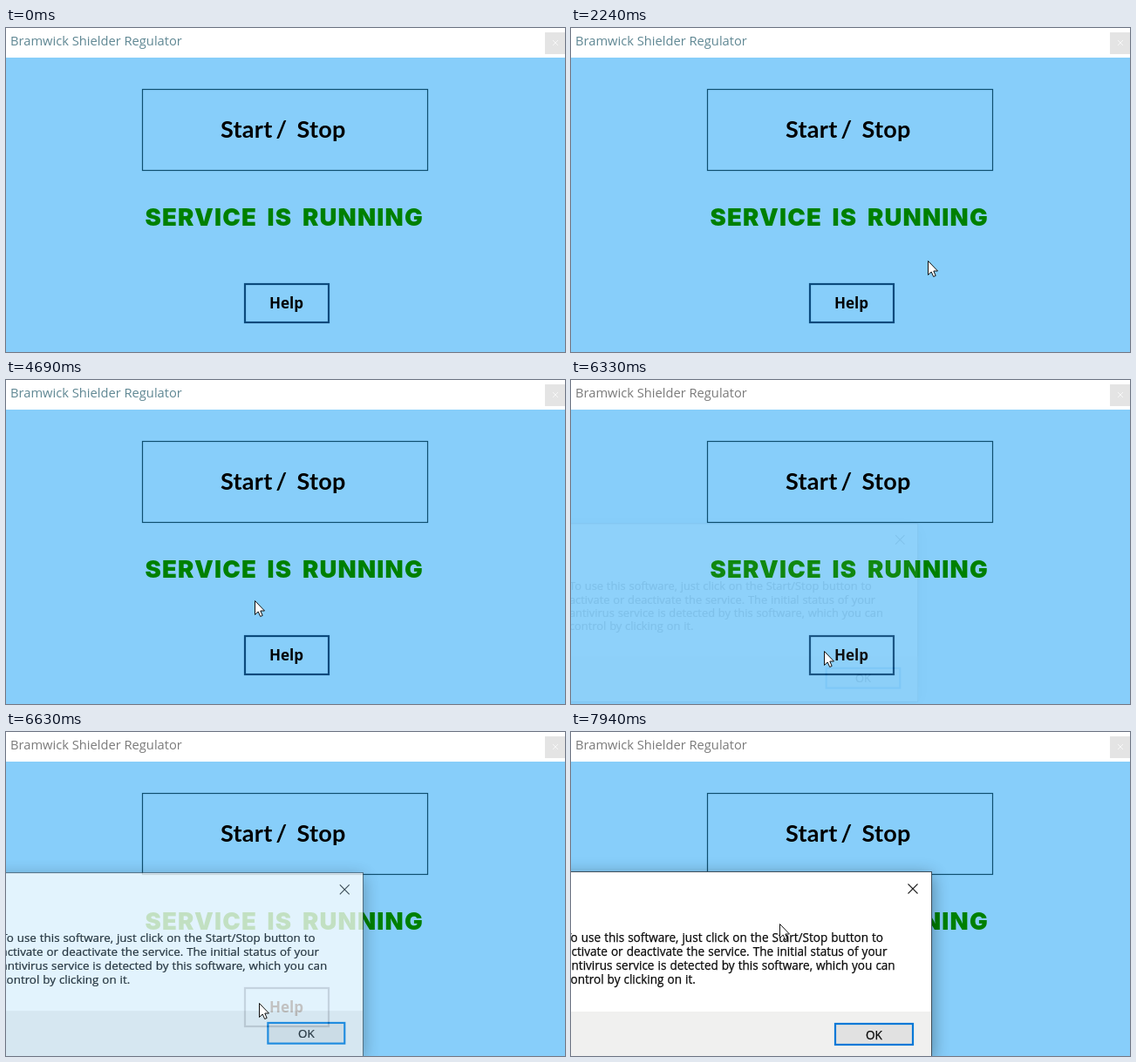
These frames come from a looping animation (641 by 372 pixels, 8000 ms). An HTML page:

```html
<!DOCTYPE html>
<html lang="en">
<head>
<meta charset="utf-8">
<title>Service controller</title>
<style>
  html, body { margin: 0; width: 100%; height: 100%; overflow: hidden; background: #87cefa; }
  svg { display: block; width: 100%; height: 100%; }
  text { font-family: "Open Sans", "Noto Sans", sans-serif; white-space: pre; }
  .caption { font-size: 14.7px; }
  .action { font: 700 27px Lato, sans-serif; letter-spacing: .3px; }
  .status { font: 900 27.5px Inter, sans-serif; letter-spacing: 1.2px; fill: #008000; }
  .help { font-size: 17px; font-weight: 700; }
  .message { font-size: 13.55px; word-spacing: .5px; fill: #0a0a0a; stroke: #0a0a0a; stroke-width: .25px; }
</style>
</head>
<body>
<svg viewBox="0 0 641 372">
  <defs>
    <filter id="blur" x="-20%" y="-20%" width="140%" height="140%">
      <feGaussianBlur stdDeviation="10"/>
    </filter>
  </defs>

  <rect width="641" height="372" fill="#87cefa"/>
  <rect width="641" height="34" fill="#fff"/>
  <text id="caption" class="caption" x="5" y="20">Bramwick Shielder Regulator</text>
  <rect x="618" y="5" width="23" height="25" fill="#e4e4e4"/>
  <path d="M627 14l6 6m0-6l-6 6" stroke="#f6f6f6"/>

  <rect x="156.5" y="70.5" width="327" height="93" fill="none" stroke="#0f4f70" stroke-width="1.2"/>
  <text class="action" x="246" y="126">Start</text>
  <text class="action" x="309.5" y="126">/</text>
  <text class="action" x="333.5" y="126">Stop</text>

  <text class="status" x="159.5" y="227">SERVICE</text>
  <text class="status" x="299.5" y="227">IS</text>
  <text class="status" x="340" y="227">RUNNING</text>

  <rect x="274" y="294" width="96" height="44" fill="none" stroke="#0b4a7c" stroke-width="2.2"/>
  <text class="help" x="321.5" y="322" text-anchor="middle">Help</text>

  <g id="dialog">
    <rect x="-220" y="165" width="634" height="212" fill="#000" opacity=".4" filter="url(#blur)"/>
    <rect x="-220" y="160" width="634" height="216" fill="#3f505c"/>
    <rect x="-219" y="161" width="632" height="214" fill="#fff"/>
    <rect x="-219" y="321" width="632" height="54" fill="#f0f0ef"/>
    <path d="M386.500 174.500l11 11m0-11l-11 11" stroke="#222" stroke-width="1.1"/>
    <g id="message"></g>
    <rect x="303" y="335" width="89" height="24" fill="#e1e1e1" stroke="#0078d7" stroke-width="2.2"/>
    <text class="message" x="347.5" y="352.5" text-anchor="middle">OK</text>
  </g>

  <path id="cursor" d="M.5 .5V16.500L4.200 13L6.700 18.500L9.200 17.400L6.800 12H11.500Z"
        fill="#fff" stroke="#111" stroke-linejoin="round"/>
</svg>

<script>
  const LOOP = 8000;
  const el = id => document.getElementById(id);
  const caption = el('caption'), dialog = el('dialog'), cursor = el('cursor');

  const lines = [
    'To use this software, just click on the Start/Stop button to',
    'activate or deactivate the service. The initial status of your',
    'antivirus service is detected by this software, which you can',
    'control by clicking on it.'
  ];
  el('message').innerHTML = lines.map((line, i) =>
    `<text class="message" x="-7" y="${241 + 16 * i}">${line}</text>`).join('');

  // Pointer path: time, x, y
  const path = [
    [120, 556, 367], [920, 491, 319], [1740, 439, 281], [2480, 395, 260],
    [2560, 395, 260], [3300, 348, 229], [3380, 348, 229], [3700, 328, 227],
    [4130, 304, 233], [4210, 304, 233], [4690, 285, 253], [5030, 281, 273],
    [5750, 290, 311], [7200, 290, 311], [7940, 239, 220], [LOOP, 239, 220]
  ];

  const clamp = v => Math.max(0, Math.min(1, v));
  const smooth = v => v * v * (3 - 2 * v);

  function pointerAt(t) {
    const i = Math.max(1, path.findIndex(p => p[0] >= t));
    const [t0, x0, y0] = path[i - 1], [t1, x1, y1] = path[i];
    const k = clamp((t - t0) / (t1 - t0));
    return [x0 + (x1 - x0) * k, y0 + (y1 - y0) * k];
  }

  function draw(t) {
    caption.setAttribute('fill', t < 5990 ? '#5f8793' : '#7a7a7a');

    const open = smooth(clamp((t - 6245) / 565));
    const scale = 0.9475 + 0.0525 * open;
    dialog.setAttribute('opacity', open);
    dialog.setAttribute('transform', `translate(93 250) scale(${scale}) translate(-93 -250)`);

    const [x, y] = pointerAt(t);
    cursor.setAttribute('visibility', t < 120 ? 'hidden' : 'visible');
    cursor.setAttribute('transform', `translate(${Math.round(x)} ${Math.round(y)})`);
  }

  const start = performance.now();
  function tick() {
    draw((performance.now() - start) % LOOP);
    requestAnimationFrame(tick);
  }
  tick();
</script>
</body>
</html>
```
